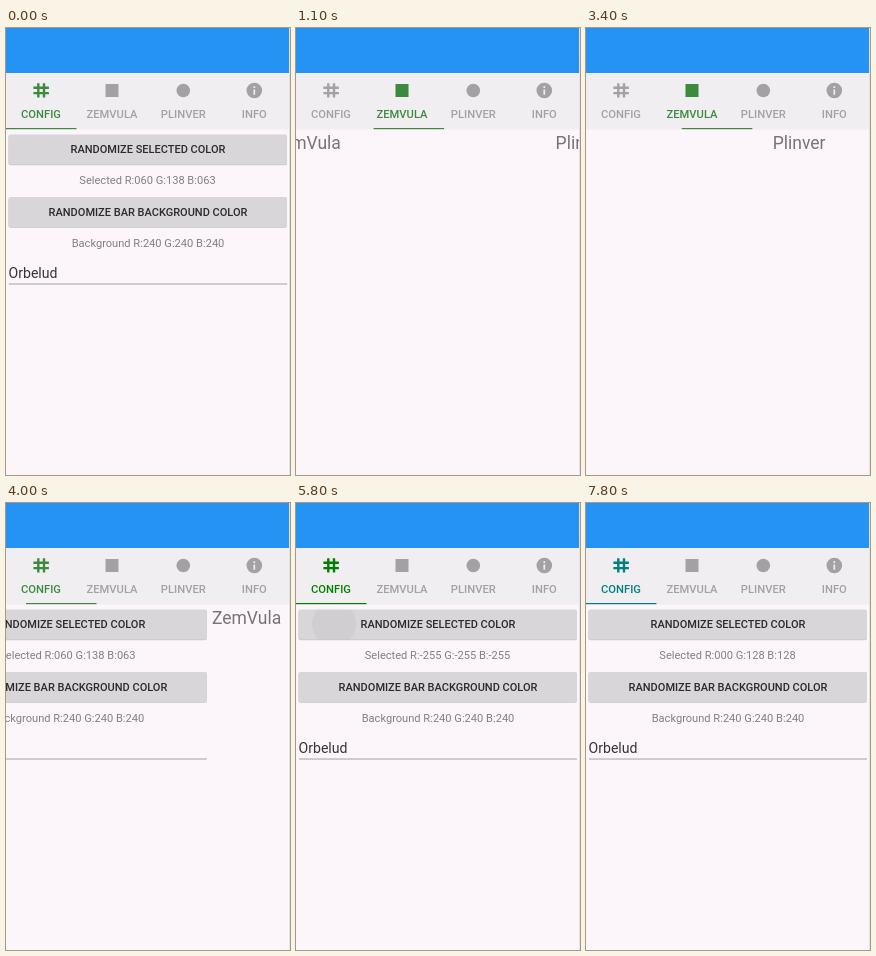
Animation, 284 px wide and 447 px high, one loop 8 s. Source, as an HTML page:

```html
<!DOCTYPE html>
<html lang="en">
<head>
<meta charset="utf-8">
<title>Tabbed pages</title>
<style>
  html, body { margin: 0; width: 100%; height: 100%; overflow: hidden; background: #fcf6fa; }
  svg { display: block; width: 100%; height: 100%; }
  text { font-family: Roboto, sans-serif; }
  .tab text { font-size: 11.2px; font-weight: 500; text-anchor: middle; fill: currentColor; }
  .caption { font-size: 11px; font-weight: 500; text-anchor: middle; fill: #2b2b2d; }
  .label { font-size: 11.1px; text-anchor: middle; fill: #827f82; }
  .title { font-size: 17.5px; fill: #777477; }
  .entry { font-size: 14.1px; fill: #363437; }
</style>
</head>
<body>
<svg viewBox="0 0 284 447">
  <defs>
    <clipPath id="buttonClip"><rect x="2.5" y="106.5" width="278.5" height="30" rx="1.5"/></clipPath>
  </defs>
  <rect width="284" height="447" fill="#fcf6fa"/>
  <g id="pages">
    <g id="config">
      <g id="buttons"></g>
      <circle id="ripple" cx="38" cy="121" clip-path="url(#buttonClip)"/>
      <text class="caption" x="142" y="125">RANDOMIZE SELECTED COLOR</text>
      <text class="caption" x="142" y="187.5">RANDOMIZE BAR BACKGROUND COLOR</text>
      <text class="label" id="selected" x="141.5" y="156.2"></text>
      <text class="label" x="142" y="218.7">Background R:240 G:240 B:240</text>
      <text class="entry" x="2.5" y="249.5">Orbelud</text>
      <path d="M3 256H281" stroke="#a29ea2"/>
    </g>
    <text class="title" x="286" y="120.5">ZemVula</text>
    <text class="title" x="570" y="120.5">Plinver</text>
    <text class="title" x="854" y="120.5">Info</text>
  </g>
  <rect width="284" height="45" fill="#2493f3"/>
  <rect y="45" width="284" height="56.5" fill="#f0eef1"/>
  <g id="tabs">
    <g class="tab">
      <path d="M32.3 55.2V69.6M38 55.2V69.6M27.4 59.7H42.9M27.4 65.1H42.9"
            fill="none" stroke="currentColor" stroke-width="2.4"/>
      <text x="35" y="90">CONFIG</text>
    </g>
    <g class="tab">
      <rect x="99.5" y="56" width="13" height="13" fill="currentColor"/>
      <text x="106" y="90">ZEMVULA</text>
    </g>
    <g class="tab">
      <circle cx="177.3" cy="62.5" r="6.8" fill="currentColor"/>
      <text x="177.3" y="90">PLINVER</text>
    </g>
    <g class="tab">
      <circle cx="248.3" cy="62.5" r="7.8" fill="currentColor"/>
      <path d="M248.3 58.2V60M248.3 61.5V66.8" stroke="#f0eef1" stroke-width="1.7"/>
      <text x="248.3" y="90">INFO</text>
    </g>
  </g>
  <rect id="indicator" y="100" width="70.5" height="1.2"/>
  <path d="M283.5 0V447" stroke="#dfe5ec"/>
</svg>
<script>
const LOOP = 8000, STEP = 100, PAGE = 284, TAB = 71;
const GRAY = '#a3a1a4';
const $ = id => document.getElementById(id);

// Each swipe: start time and direction, following one drag-and-settle curve.
const swipes = [[150, 1], [1000, 1], [1800, 1], [2600, -1], [3120, -1], [3700, -1]];
const settle = [0, .093, .38, .718, .89, .96, .99, 1];

// Each press of the first button: time, shown values, applied colour.
const presses = [
  [4900, [0, 128, 0], [0, 128, 0]],
  [5800, [-255, -255, -255], [0, 128, 0]],
  [6600, [128, 128, 0], [128, 128, 0]],
  [7400, [0, 128, 128], [0, 128, 128]]
];
const initial = [-LOOP, [60, 138, 63], [60, 138, 63]];

$('buttons').innerHTML = [106.5, 169].map(y => `
  <rect x="2.5" y="${y + .7}" width="278.5" height="30" rx="2" fill="#c6c3c7"/>
  <rect x="2.5" y="${y}" width="278.5" height="30" rx="1.5" fill="#d8d6d9"/>`).join('');

function progress(steps) {
  const last = settle.length - 1;
  const k = Math.min(Math.max(steps, 0), last);
  const i = Math.min(Math.floor(k), last - 1);
  return settle[i] + (settle[i + 1] - settle[i]) * (k - i);
}

const pad = n => n < 0 ? String(n) : String(n).padStart(3, '0');

function draw(time) {
  const t = Math.floor(time / STEP) * STEP;
  const pos = swipes.reduce((sum, [start, dir]) => sum + dir * progress((t - start) / STEP), 0);
  const [pressed, [r, g, b], color] = presses.filter(p => p[0] <= t).pop() || initial;
  const accent = `rgb(${color})`;

  $('pages').setAttribute('transform', `translate(${-pos * PAGE} 0)`);
  $('indicator').setAttribute('x', pos * TAB);
  $('indicator').setAttribute('fill', accent);
  [...$('tabs').children].forEach((tab, i) => {
    tab.style.color = i === Math.round(pos) ? accent : GRAY;
  });
  $('selected').textContent = `Selected R:${pad(r)} G:${pad(g)} B:${pad(b)}`;

  const age = Math.min((t - pressed) / 400, 1);
  $('ripple').setAttribute('r', 22 + 150 * age);
  $('ripple').setAttribute('opacity', .04 * (1 - age));
}

function tick() {
  draw(performance.now() % LOOP);
  requestAnimationFrame(tick);
}
tick();
</script>
</body>
</html>
```
